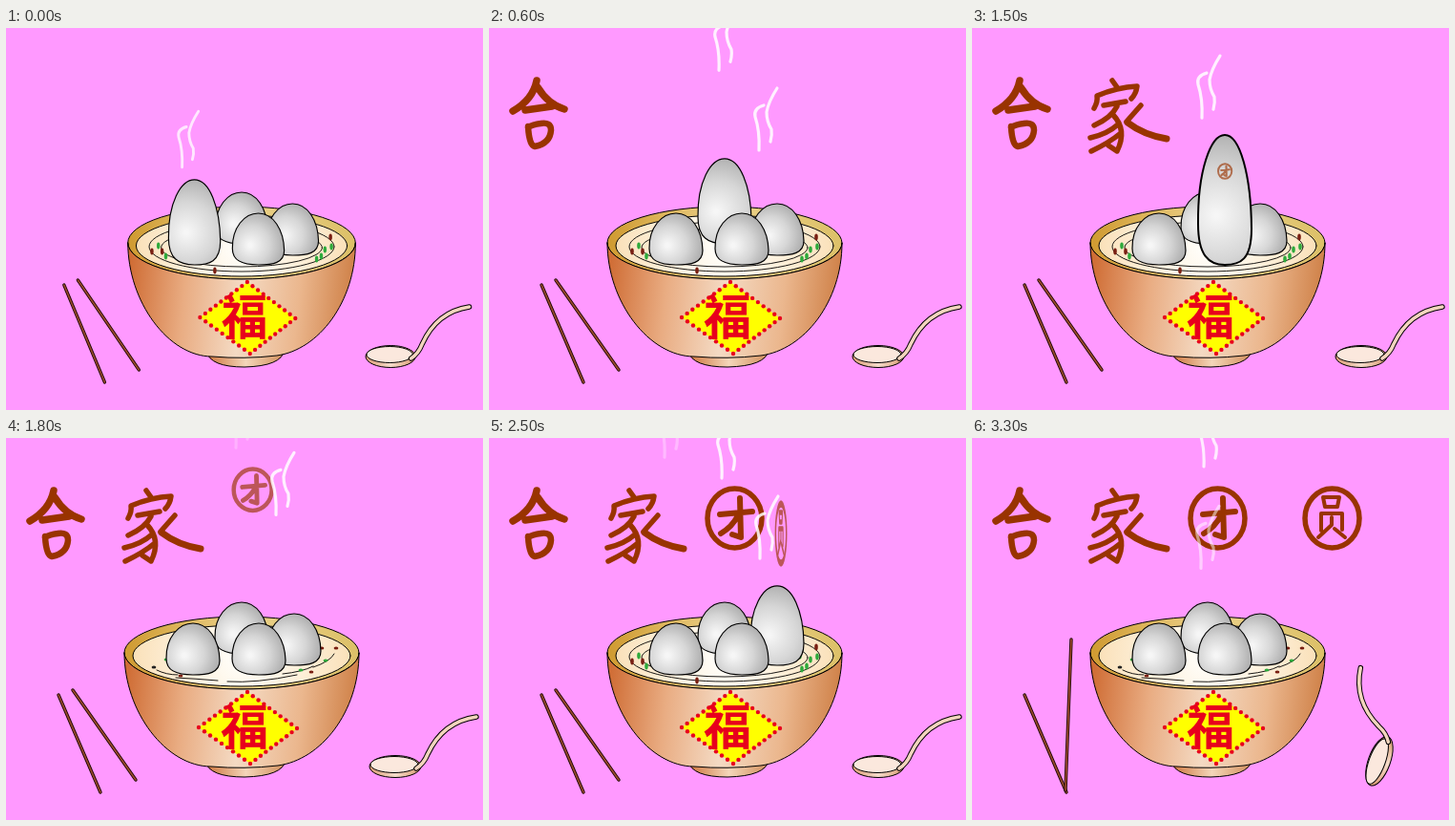
An HTML page with a canvas for the animation above (3.4 s loop, 500x400 px).

```html
<!DOCTYPE html>
<html lang="zh">
<head>
<meta charset="utf-8">
<style>
html, body { margin: 0; width: 100%; height: 100%; overflow: hidden; background: #f9f; }
canvas { display: block; }
</style>
</head>
<body>
<canvas id="stage" width="500" height="400"></canvas>
<script>
const LOOP = 3400, STEP = 100, FLIGHT = 500;
const ctx = document.getElementById('stage').getContext('2d');
const path = d => new Path2D(d);
const lerp = (a, b, u) => a + (b - a) * u;
const clamp = u => Math.max(0, Math.min(1, u));

function gradient(g, colors) {
  colors.forEach((c, i) => g.addColorStop(i / (colors.length - 1), c));
  return g;
}

const bodyFill = gradient(ctx.createLinearGradient(124, 265, 370, 290),
  ['#cf6c34', '#e9ac82', '#f4dac3', '#ebb78e', '#cd7d43']);
const rimFill = gradient(ctx.createLinearGradient(124, 0, 370, 0), ['#cf9a30', '#ecd28a', '#dcc068']);
const soupFill = gradient(ctx.createRadialGradient(247, 228, 10, 247, 228, 116), ['#fffdf8', '#fdf0da', '#fae0b8']);
const footFill = gradient(ctx.createLinearGradient(212, 0, 291, 0), ['#cf7a43', '#f4d6ba', '#d3925f']);
const spoonFill = gradient(ctx.createLinearGradient(-27, 0, 27, 0), ['#d99a72', '#f6dccb', '#d79a70']);

const body = path('M124 225C124 287 168 344 215 344Q250 347 285 343C330 337 370 287 370 225A123 38 0 0 1 124 225Z');
const foot = path('M209 339Q213 355 250 355Q290 354 293 338Z');
// Unit dumpling: base at y 0, height 54
const dome = path('M-28 -17C-28.5 -39 -15 -54 0 -54C16 -54 27.5 -37 28 -15C28 -2 16 0 0 0C-17 0 -28 -4 -28 -17Z');
const spoonHandle = path('M22 3Q30 -2 34 -12Q50 -46 85 -51');
const ripples = path('M178 251Q198 252 222 254M232 255Q262 257 305 248M158 243Q168 248 180 248M322 240Q340 234 344 226M290 247Q310 245 322 239');
const steamShape = path('M-1 -15Q-12 -12 -10 -3Q-5 12 -6 32M13 -33Q4 -19 2 -8Q2 2 7 10Q8 16 6 23');

// In drawing order: x, base y, time of full stretch
const balls = [[247, 226, 700], [302, 238, 2400], [196, 248, 100], [265, 248, 1500]];

const glyphs = [
  { launch: 100, from: [196, 150], via: [20, 10], to: [52, 90], lines: [
    [7.5, 'M50 55Q46 75 25 87M51 62Q62 80 79 85M38 86L66 82'],
    [6.5, 'M41 103Q42 123 48 124Q64 121 65 107Q65 98 54 100Q46 101 41 104']] },
  { launch: 700, from: [248, 130], via: [96, 26], to: [164, 93], lines: [
    [5.5, 'M147 55L152 62M128 84Q132 77 131 71Q152 62 173 61Q172 69 167 74M138 81L161 77M152 82Q146 94 128 102M148 91Q163 107 152 129L143 123M153 101Q142 111 124 115M156 110Q144 120 125 129M177 81L162 98'],
    [7, 'M163 99Q180 112 204 116']] },
  { launch: 1500, from: [265, 150], via: [257, 0], to: [257, 84], lines: [
    [5.5, 'M229 84a28.5 31 0 1 0 57 0a28.5 31 0 1 0 -57 0'],
    [6, 'M242 80L276 77M263 63L264 104L255 101M261 81Q255 93 243 100']] },
  { launch: 2400, from: [302, 145], via: [305, 12], to: [377, 84], tall: true, lines: [
    [5.5, 'M349 84a28.5 31 0 1 0 57 0a28.5 31 0 1 0 -57 0'],
    [4, 'M368 62H385L383 72H370ZM366 97V79H388V96M377 83V91L363 104M380 95L391 104']] }
];
for (const g of glyphs) g.lines = g.lines.map(([w, d]) => [w, path(d)]);

// x, time at mid height, opacity
const steam = [
  [190, 0, 1], [247, 226, 1], [289, 525, 1], [190, 911, 1], [247, 1304, 1], [289, 1555, 1],
  [190, 1854, .4], [190, 2040, .6], [250, 2118, 1], [290, 2418, 1], [249, 2875, 1], [246, 3255, .6]
];

const calmBits = [[155, 240, 0], [168, 232, 1], [250, 198, 2], [320, 245, 2], [331, 220, 2],
  [335, 233, 1], [346, 220, 2], [322, 211, 1], [183, 249, 2], [309, 243, 1]];
const stirredBits = [[150, 234, 2], [157, 228, 1], [161, 234, 2], [165, 239, 1], [218, 254, 2],
  [328, 242, 1], [326, 228, 1], [337, 232, 1], [344, 229, 1], [333, 239, 1], [343, 219, 2]];
const bitColors = ['#222', '#2eaa3c', '#7a1f12'];

function fillStroke(shape, fill, width = 1) {
  ctx.fillStyle = fill;
  ctx.fill(shape);
  ctx.strokeStyle = '#000';
  ctx.lineWidth = width;
  ctx.stroke(shape);
}

function oval(x, y, rx, ry) {
  const p = new Path2D();
  p.ellipse(x, y, rx, ry, 0, 0, 7);
  return p;
}

function drawSoup(stirred) {
  fillStroke(oval(247, 225, 123, 38), rimFill);
  fillStroke(oval(247, 228, 114, 32), soupFill);
  ctx.lineWidth = .9;
  if (stirred) {
    ctx.stroke(oval(247, 229, 100, 26));
    ctx.stroke(oval(247, 230, 87, 20));
  } else ctx.stroke(ripples);
  for (const [x, y, c] of stirred ? stirredBits : calmBits) {
    ctx.fillStyle = bitColors[c];
    ctx.fill(stirred ? oval(x, y, 1.8, 3.4) : oval(x, y, 2.4, 1.6));
  }
}

function drawEmblem() {
  const corners = [[253, 266], [305, 304], [256, 341], [202, 303]];
  ctx.fillStyle = '#ff0';
  ctx.beginPath();
  corners.forEach(p => ctx.lineTo(...p));
  ctx.fill();
  ctx.fillStyle = '#e8001c';
  corners.forEach(([x, y], i) => {
    const [nx, ny] = corners[(i + 1) % 4];
    for (let k = 0; k < 9; k++) ctx.fill(oval(lerp(x, nx, k / 9), lerp(y, ny, k / 9), 2.2, 2.2));
  });
  ctx.font = '700 50px "Noto Sans CJK SC", "Noto Sans CJK", sans-serif';
  ctx.textAlign = 'center';
  ctx.fillText('福', 250, 321);
}

function drawBall(x, y, rise) {
  const h = 54 + rise;
  const shape = new Path2D();
  shape.addPath(dome, new DOMMatrix([1, 0, 0, h / 54, x, y]));
  const light = ctx.createRadialGradient(x - 9, y - h * .38, 2, x - 6, y - h * .4, h * .68);
  fillStroke(shape, gradient(light, ['#f6f6f6', '#d6d6d6', '#a8a8a8']), rise > 60 ? 2 : 1.2);
}

function drawStick(x1, y1, x2, y2) {
  for (const [color, width] of [['#1c0a04', 3.4], ['#a04a2c', 1.6]]) {
    ctx.strokeStyle = color;
    ctx.lineWidth = width;
    ctx.beginPath();
    ctx.moveTo(x1, y1);
    ctx.lineTo(x2, y2);
    ctx.stroke();
  }
}

function drawSpoon(u) {
  ctx.save();
  ctx.translate(lerp(408, 426, u), lerp(343, 338, u));
  ctx.rotate(-1.22 * u);
  fillStroke(oval(0, 1, 27, 11.5), spoonFill);
  fillStroke(oval(-1, -1, 25, 8.5), '#fbe8dd');
  ctx.strokeStyle = '#000';
  ctx.lineWidth = 5.5;
  ctx.stroke(spoonHandle);
  ctx.strokeStyle = '#f3d5bd';
  ctx.lineWidth = 3.5;
  ctx.stroke(spoonHandle);
  ctx.restore();
}

function drawGlyph({ launch, from, via, to, tall, lines }, t) {
  if (t < launch) return;
  const u = clamp((t - launch) / FLIGHT);
  const at = i => lerp(lerp(from[i], via[i], u), lerp(via[i], to[i], u), u);
  const size = tall ? u : lerp(.25, 1, u);
  ctx.save();
  ctx.globalAlpha = u < 1 ? .65 : 1;
  ctx.translate(at(0), at(1));
  ctx.scale(size, tall ? 1 : size);
  ctx.translate(-to[0], -to[1]);
  ctx.strokeStyle = '#993300';
  for (const [width, line] of lines) {
    ctx.lineWidth = width * lerp(1.4, 1, u);
    ctx.stroke(line);
  }
  ctx.restore();
}

function drawSteam([x, mid, opacity], t) {
  const y = 117 - (t - mid) * .28;
  if (y > 132 || y < -30) return;
  const grow = clamp((135 - y) / 20);
  ctx.save();
  ctx.globalAlpha = opacity * grow * .85 * clamp((y + 30) / 30);
  ctx.translate(x, y);
  ctx.scale(grow, grow);
  ctx.strokeStyle = '#fff';
  ctx.lineWidth = 3.2;
  ctx.stroke(steamShape);
  ctx.restore();
}

function draw(t) {
  const rises = balls.map(([, , peak]) =>
    82 * Math.max(0, 1 - (t < peak ? (peak - t) / 175 : (t - peak) / 155)));
  const turn = clamp((t - 3000) / 300);
  const zoom = Math.min(1, .97 + t * .0001);
  ctx.fillStyle = '#f9f';
  ctx.fillRect(0, 0, 500, 400);
  ctx.lineCap = ctx.lineJoin = 'round';

  ctx.save();
  ctx.translate(248, 0);
  ctx.scale(zoom, 1);
  ctx.translate(-248, 0);
  drawSoup(rises.some(r => r > 0));
  fillStroke(foot, footFill);
  fillStroke(body, bodyFill);
  drawEmblem();
  balls.forEach(([x, y], i) => drawBall(x, y, rises[i]));
  drawStick(55, 269, 99, 371);
  drawStick(lerp(70, 104, turn), lerp(264, 211, turn), lerp(136, 98, turn), lerp(358, 369, turn));
  drawSpoon(turn);
  ctx.restore();

  glyphs.forEach(g => drawGlyph(g, t));
  steam.forEach(s => drawSteam(s, t));
}

const start = performance.now();
function tick() {
  const t = (performance.now() - start) % LOOP;
  draw(Math.floor(t / STEP) * STEP);
  requestAnimationFrame(tick);
}
tick();
</script>
</body>
</html>
```
